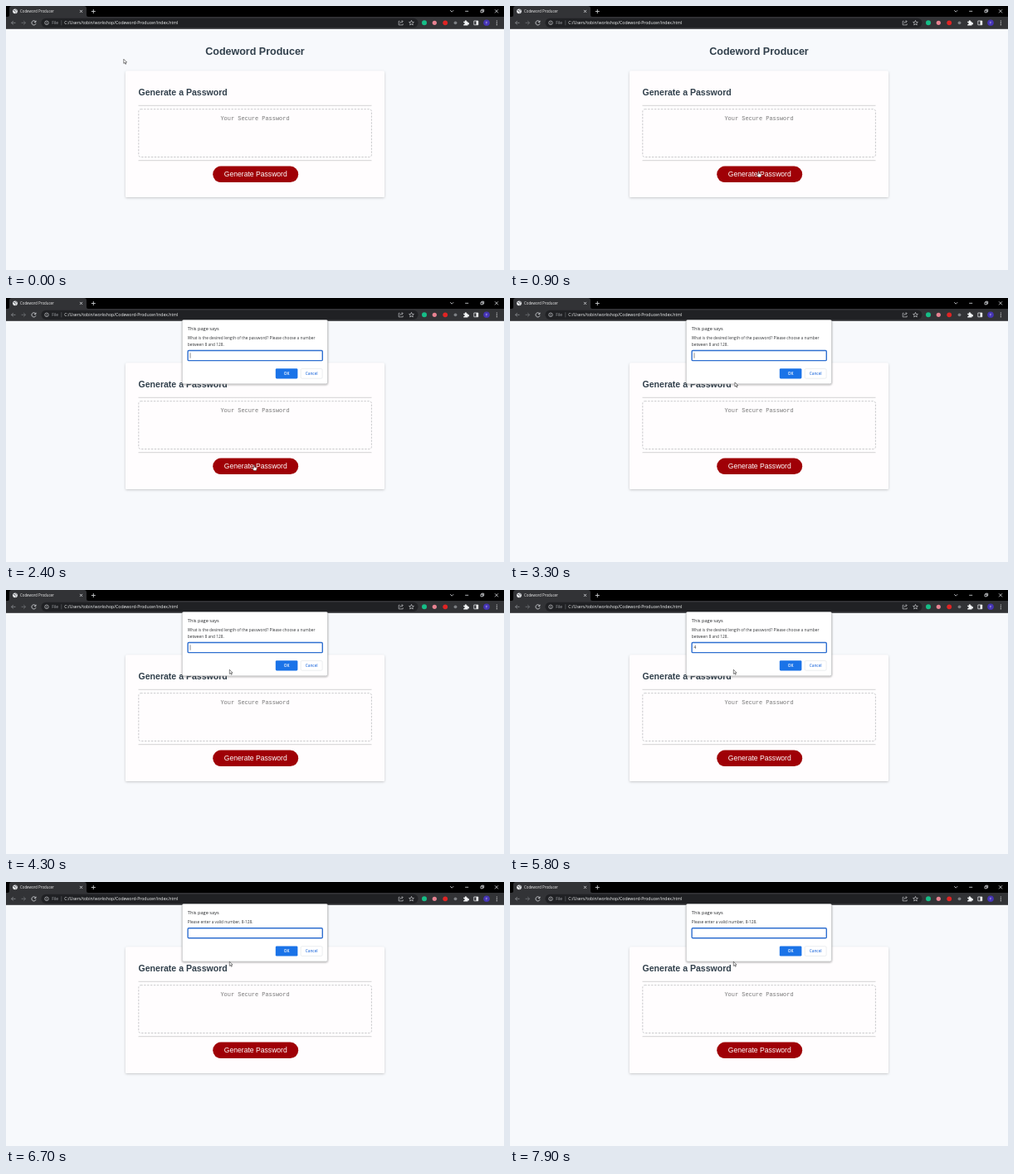
An HTML page that plays this animation: 600 px wide and 319 px high, repeating every 8 s.

```html
<!DOCTYPE html>
<html lang="en">
<head>
<meta charset="utf-8">
<title>Codeword Producer</title>
<style>
  html, body { margin: 0; width: 100%; height: 100%; overflow: hidden; background: #f7f9fc; }
  svg { display: block; width: 100%; height: 100%; }
  .ui { font-family: "Open Sans", "Noto Sans", sans-serif; }
  .page { font-family: "Liberation Sans", Arial, sans-serif; }
  .bold { font-weight: 700; fill: #303f4b; }
  .mono { font-family: "Liberation Mono", "Courier New", monospace; }
  .mid { text-anchor: middle; }
  .line { fill: none; stroke: #dfe1e5; stroke-width: .8; }
</style>
</head>
<body>
<svg viewBox="0 0 600 319" xmlns="http://www.w3.org/2000/svg">
  <defs>
    <filter id="cardShadow" x="-5%" y="-5%" width="110%" height="115%">
      <feDropShadow dx="0" dy="1" stdDeviation="1.6" flood-color="#000" flood-opacity=".2"/>
    </filter>
    <filter id="dialogShadow" x="-5%" y="-5%" width="110%" height="120%">
      <feDropShadow dx="0" dy=".8" stdDeviation="1" flood-color="#000" flood-opacity=".4"/>
    </filter>
  </defs>

  <rect width="600" height="319" fill="#f7f9fc"/>

  <g class="page">
    <text class="bold mid" x="300" y="59" font-size="12.5">Codeword Producer</text>
    <rect x="144" y="78.5" width="312" height="152.5" rx="1.5" fill="#fffdfe" filter="url(#cardShadow)"/>
    <text class="bold" x="159.5" y="108.4" font-size="10.55">Generate a Password</text>
    <path d="M159.5 120.3H440.5M159.5 186.7H440.5" stroke="#cfcfd1" stroke-width=".9"/>
    <rect x="159.8" y="124.7" width="280.6" height="57.8" rx="2.5" fill="#fffdfe" stroke="#c3c5c7" stroke-width=".9" stroke-dasharray="2.4 1.5"/>
    <text class="mono mid" x="300" y="138" font-size="6.93" fill="#777">Your Secure Password</text>
    <rect x="249.2" y="193.6" width="103" height="19.4" rx="9.7" fill="#9f0006"/>
    <text class="mid" x="300.8" y="206.2" font-size="8.6" fill="#fff">Generate Password</text>
  </g>

  <g class="ui">
    <rect width="600" height="27.5" fill="#000"/>
    <path d="M0 13H2Q4 13 4 11V3Q4 0 7 0H94Q97 0 97 3V11Q97 13 99 13H600V27.5H0Z" fill="#323336"/>
    <circle cx="11" cy="6.3" r="2.9" fill="#e8eaed"/>
    <path d="M9 5.2l1.8 .5 .3 1.4M11.4 4.2l1.7 1.3M11.2 8.3l1.2-1" stroke="#45474a" stroke-width=".8" fill="none"/>
    <text x="17" y="8" font-size="4.4" fill="#eee">Codeword Producer</text>
    <path class="line" d="M89 4.9l3 3m0-3l-3 3M102.8 6.5h5m-2.5-2.5v5"/>
    <path class="line" d="M535.2 5.2l2 2 2-2M553.2 6.3h4M572 5.2h2.6v2.6h-2.6zM573 5.2v-1h2.7v2.7h-1M589 4.3l4 4m0-4l-4 4"/>

    <g class="line">
      <path d="M11.5 20.3h-5m2.3-2.3l-2.3 2.3 2.3 2.3" stroke="#8b8e92"/>
      <path d="M18.5 20.3h5m-2.3-2.3l2.3 2.3-2.3 2.3" stroke="#707377"/>
      <path d="M35.6 18.8A2.6 2.6 0 1 0 36 21.2M36 17.6v1.9h-1.9"/>
    </g>
    <rect x="42.5" y="14.7" width="454" height="11.2" rx="5.6" fill="#202124"/>
    <circle class="line" cx="49" cy="20.3" r="2.3" style="stroke-width:.6"/>
    <path d="M49 19.8v1.7M49 18.8v.5" stroke="#dfe1e5" stroke-width=".6"/>
    <text x="55.3" y="22.2" font-size="4.9" fill="#a5a8ad">File</text>
    <path d="M66.8 17.3v6" stroke="#777a7e" stroke-width=".5"/>
    <text x="70.2" y="22.2" font-size="5.14" fill="#f1f3f4">C:/Users/tobin/workshop/Codeword-Producer/index.html</text>
    <path class="line" d="M474.5 18.3h-1.3v4.6h5v-1.5M474.8 21q.3-2.3 3.2-2.3m-1.2-1.5l1.5 1.5-1.5 1.4" style="stroke-width:.6"/>
    <path class="line" d="M488.5 17.4l.8 2 2.1.1-1.6 1.4.5 2.1-1.8-1.1-1.8 1.1.5-2.1-1.6-1.4 2.1-.1z" style="stroke-width:.6"/>

    <circle cx="504" cy="20.3" r="3" fill="#16bd87"/>
    <circle cx="516.3" cy="20.3" r="2.6" fill="#e78291"/>
    <circle cx="529.2" cy="20.3" r="2.9" fill="#df2424"/>
    <circle cx="541.5" cy="20.3" r="1.9" fill="#7d8084"/>
    <path d="M551.2 18.7h1.7a1.1 1.1 0 1 1 2 0h1.5v1.5a1.1 1.1 0 1 1 0 2v1.4h-5.2v-1.6a1 1 0 1 0 0-1.8z" fill="#f1f3f4"/>
    <path d="M563.8 18h5v4.8h-5z" class="line"/><path d="M566.5 18h2.3v4.8h-2.3z" fill="#f1f3f4"/>
    <circle cx="579" cy="20.3" r="3.8" fill="#4534b5"/>
    <text class="mid" x="579" y="21.9" font-size="4.3" fill="#fff">T</text>
    <path d="M591.3 18v.1m0 2.2v.1m0 2.2v.1" stroke="#f1f3f4" stroke-width="1.1" stroke-linecap="round"/>
  </g>

  <g id="dialog" class="ui">
    <rect id="panel" x="212.3" y="26.4" width="175.2" height="77.4" rx="1.8" fill="#fff" stroke="#aeb0b3" stroke-width=".5" filter="url(#dialogShadow)"/>
    <text x="218.8" y="39.3" font-size="5.66" fill="#25272a">This page says</text>
    <g font-size="4.81" fill="#36383b">
      <text id="message" x="218.8" y="50.3"></text>
      <text id="message2" x="218.8" y="58.2">between 8 and 128.</text>
    </g>
    <g id="controls">
      <rect x="219.1" y="63.5" width="162.2" height="12.1" rx="1.2" fill="#fff" stroke="#2f6fd0" stroke-width="1.4"/>
      <text id="entry" x="221.5" y="71.3" font-size="4.8" fill="#222">4</text>
      <path id="caret" d="M222 66.3v6.4" stroke="#444" stroke-width=".6"/>
      <rect x="324.8" y="85.2" width="26.6" height="12.2" rx="1.4" fill="#1a73e8"/>
      <rect x="355.2" y="85.5" width="25.9" height="11.7" rx="1.4" fill="#fff" stroke="#dfe2e6" stroke-width=".6"/>
      <g class="mid" font-size="4.7" font-weight="600">
        <text x="338.1" y="93" fill="#fff">OK</text>
        <text x="368.2" y="93" fill="#3b7ce0">Cancel</text>
      </g>
    </g>
  </g>

  <g id="pointer">
    <path id="arrow" d="M0 0v5.2l1.2-1.1 .9 2 .9-.4-.9-1.9h1.7z" fill="#fff" stroke="#222" stroke-width=".55"/>
    <path id="hand" d="M-.6 .6Q0-.3 .6 .6V3l2.2.7q.6.3.4 1.2l-.6 2.3H-.4L-2 4.9q-.2-.9.6-.7l.8.6z" fill="#fff" stroke="#222" stroke-width=".45"/>
  </g>
</svg>

<script>
const LOOP = 8000, OPEN = 2100, TYPED = 5600, REOPEN = 6100;
const el = id => document.getElementById(id);
const show = (id, on) => el(id).setAttribute("display", on ? "inline" : "none");
const shift = (id, x, y) => el(id).setAttribute("transform", `translate(${x} ${y})`);

// time, x, y of the pointer tip
const path = [
  [0, 141.8, 64.2], [150, 141.8, 64.2], [850, 299.5, 199.5], [1300, 300, 201.3],
  [1900, 300, 201.3], [2100, 299, 201.3], [2700, 299, 201.3], [3400, 269.3, 96.2], [LOOP, 269.3, 96.2]
];

function pointerAt(t) {
  const i = path.findIndex(p => p[0] > t);
  const [a, b] = [path[i - 1], path[i]];
  const k = (t - a[0]) / (b[0] - a[0]);
  const eased = k * k * (3 - 2 * k);
  return [1, 2].map(n => a[n] + (b[n] - a[n]) * eased);
}

function render(t) {
  const retry = t >= REOPEN;
  const typed = t >= TYPED && !retry;
  const blinkStart = retry ? REOPEN : OPEN;

  show("dialog", t >= OPEN);
  el("panel").setAttribute("height", retry ? 69.6 : 77.4);
  el("message").textContent = retry
    ? "Please enter a valid number, 8-128."
    : "What is the desired length of the password? Please choose a number";
  show("message2", !retry);
  shift("controls", 0, retry ? -7.8 : 0);
  show("entry", typed);
  show("caret", !typed && (t - blinkStart) % 1000 < 500);

  const [x, y] = pointerAt(t);
  const overButton = x > 249 && x < 352 && y > 193.6 && y < 213;
  shift("pointer", x, y);
  show("hand", overButton);
  show("arrow", !overButton);
}

const start = performance.now();
function tick() {
  render((performance.now() - start) % LOOP);
  requestAnimationFrame(tick);
}
tick();
</script>
</body>
</html>
```
